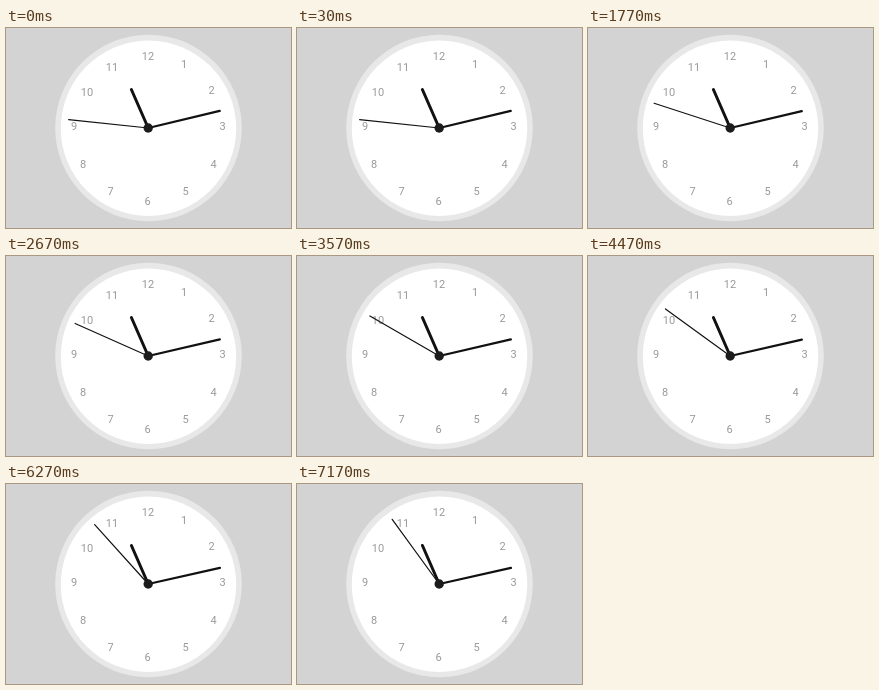
These frames come from a looping animation (285 px wide and 200 px high, 8000 ms). An HTML page:

```html
<!DOCTYPE html>
<html lang="en">
<head>
<meta charset="utf-8">
<title>Clock</title>
<style>
  html, body { margin: 0; width: 100%; height: 100%; overflow: hidden; background: #d3d3d3; }
  svg { display: block; width: 100vw; height: 100vh; }
  text { font: 11px Roboto, sans-serif; fill: #999; text-anchor: middle; }
  line { stroke: #111; stroke-linecap: round; }
</style>
</head>
<body>
<svg viewBox="0 0 285 200">
  <circle cx="142.5" cy="100" r="93.3" fill="#e8e8e8"/>
  <circle cx="142.5" cy="100.3" r="87.7" fill="#fff"/>
  <g id="numerals"></g>
  <g transform="translate(142.2 100)">
    <line id="hour" y2="-42" stroke-width="3"/>
    <line id="minute" y2="-73.5" stroke-width="2.3"/>
    <line id="second" y2="-80" stroke-width="1.2"/>
    <circle r="4.7" fill="#1c1c1c"/>
  </g>
</svg>
<script>
  const LOOP = 8000;
  const TICK = 900;
  const START = 11 * 3600 + 12 * 60 + 46; // 11:12:46

  // Centres of the numerals 1 to 12
  const positions = [
    [178, 36], [205.5, 62], [216.5, 98.5], [207.5, 136], [179.5, 163], [141.5, 173.5],
    [104.5, 163], [77, 136], [68, 98.5], [81, 64.5], [106, 39], [142, 28]
  ];
  document.getElementById('numerals').innerHTML = positions
    .map(([x, y], i) => `<text x="${x}" y="${y + 3.9}">${i + 1}</text>`)
    .join('');

  function turn(id, turns) {
    document.getElementById(id).setAttribute('transform', `rotate(${turns % 1 * 360})`);
  }

  const startTime = performance.now();

  function draw() {
    const elapsed = Math.max(0, performance.now() - startTime) % LOOP;
    // The first tick comes 30 ms early in the loop
    const seconds = START + Math.floor((elapsed + 30) / TICK);
    turn('hour', seconds / 43200);
    turn('minute', seconds / 3600);
    turn('second', seconds / 60);
    requestAnimationFrame(draw);
  }
  draw();
</script>
</body>
</html>
```
